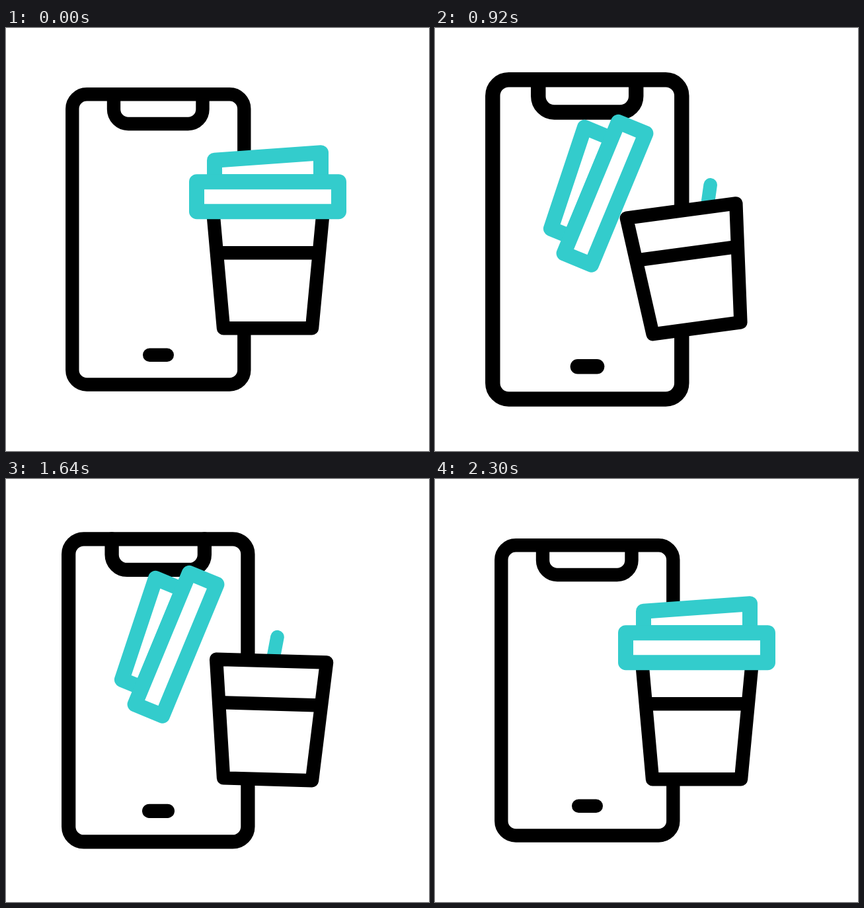
Animation of 640 by 640 pixels, one loop 2.6 s. Source, as an HTML page:

```html
<!DOCTYPE html>
<html lang="en">
<head>
<meta charset="utf-8">
<title>Phone and coffee cup</title>
<style>
  html, body { margin: 0; width: 100%; height: 100%; overflow: hidden; background: #fff; }
  svg { display: block; width: 100%; height: 100%; }
  .ink, .teal { fill: #fff; stroke-linejoin: round; stroke-linecap: round; }
  .ink { stroke: #000; stroke-width: 20.4; }
  .teal { stroke: #33cccc; stroke-width: 23; }
  .open { fill: none; }
  #straw { stroke-width: 20.6; }
</style>
</head>
<body>
<svg viewBox="0 0 640 640">
  <g id="phone" class="ink">
    <rect x="100.3" y="100.3" width="260" height="439.2" rx="22"/>
    <path class="open" d="M163 100.3V123a22 22 0 0 0 22 22h90.5a22 22 0 0 0 22-22V100.3"/>
    <path d="M217.2 494.8h26.6"/>
  </g>
  <path id="straw" class="teal" d="M0 0V70"/>
  <g id="cup" class="ink">
    <path d="M313 275H480L463 454.3H329Z"/>
    <path d="M320 340.3H472"/>
  </g>
  <g id="lid" class="teal">
    <path d="M-80.5-22.5V-55L80.5-66.5V-22.5Z"/>
    <rect x="-107.5" y="-22.5" width="215" height="45"/>
  </g>
</svg>
<script>
  const LOOP = 2600, CLOSED = 2300, OPENING = 500;
  const [phone, cup, straw, lid] =
    ['phone', 'cup', 'straw', 'lid'].map(id => document.getElementById(id));

  const clamp = p => Math.min(1, Math.max(0, p));
  const ease = p => (1 - Math.cos(Math.PI * clamp(p))) / 2;
  const place = (node, value) => node.setAttribute('transform', value);

  // Eases through the peaks; each step lasts `shrink` times the one before.
  function swing(t, start, step, shrink, peaks) {
    let value = peaks[0];
    for (let i = 1; i < peaks.length; i++) {
      value += (peaks[i] - peaks[i - 1]) * ease((t - start) / step);
      start += step;
      step *= shrink;
    }
    return value;
  }

  function draw(t) {
    const zoom = swing(t, 500, 420, .846, [1, 1.1, .904, 1.051, 1]);
    place(phone, `translate(230.4 320) scale(${zoom}) translate(-230.4 -320)`);

    const tilt = swing(t, 500, 340, .95, [0, -10.3, 7.6, -1.1, 3.2, 0]);
    place(cup, `rotate(${tilt} 396.2 454.3)`);

    // The straw stirs once every 700 ms.
    const x = swing(t, 0, 350, 1, [410, 459, 348, 446, 384, 418, 410]);
    const y = swing(t, 0, 350, 1, [238, 230, 243, 235, 225, 243, 243]);
    const lean = 1 - 17.5 * Math.cos(2 * Math.PI * t / 700);
    place(straw, `translate(${x} ${y}) rotate(${lean})`);

    // The lid turns along a shallow arc, and returns the same way.
    const u = ease(Math.min(t, CLOSED - t) / OPENING), v = 1 - u;
    const lift = 3 * u * v * (49.6 * v + 31.3 * u);
    place(lid, `translate(${396 - 139 * u} ${255.2 - 5 * u - lift}) rotate(${-67.5 * u})`);
  }

  const start = performance.now();
  function tick() {
    draw((performance.now() - start) % LOOP);
    requestAnimationFrame(tick);
  }
  tick();
</script>
</body>
</html>
```
